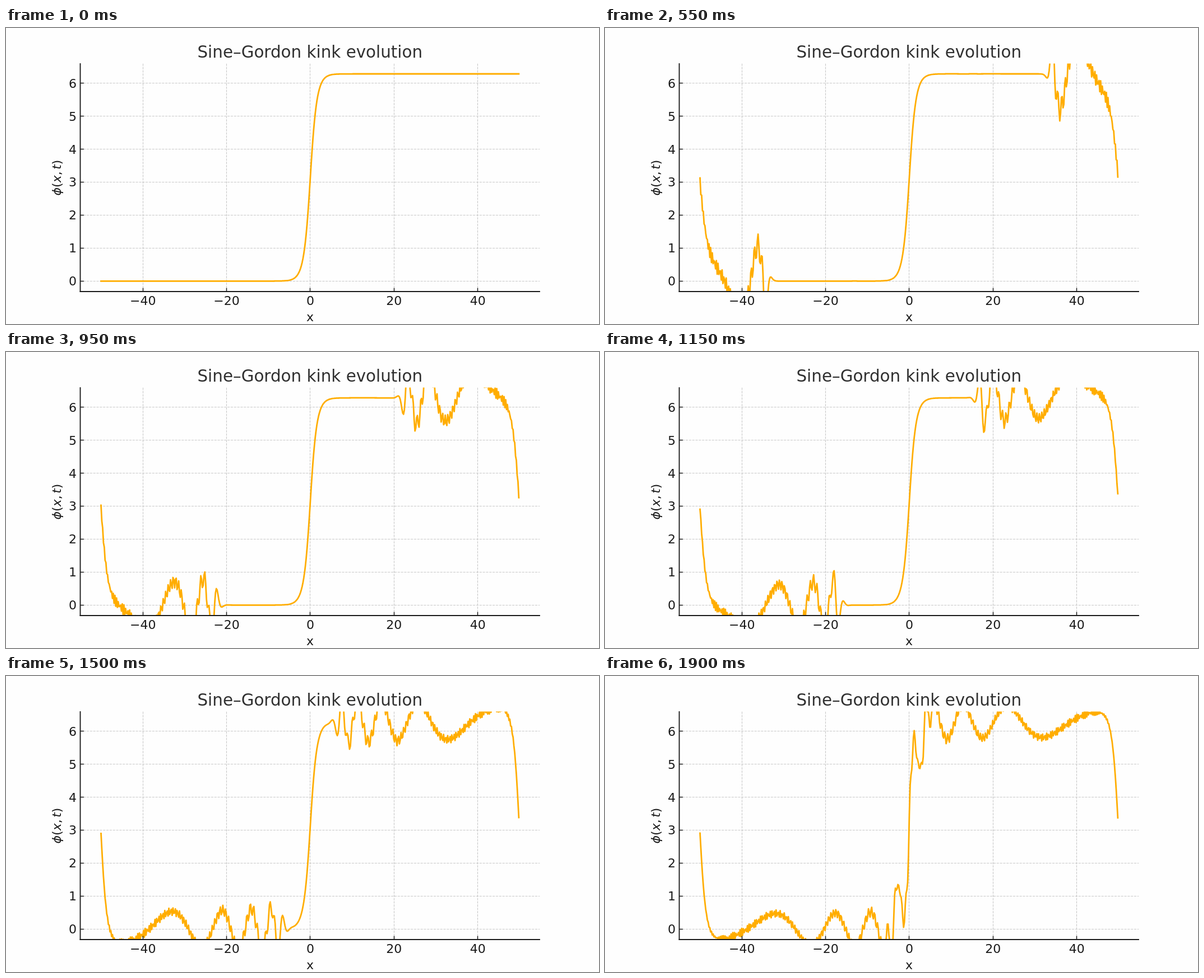
Write an HTML page that moves like this. It is 1058 px wide and 529 px high and loops after 1950 ms.

```html
<!DOCTYPE html>
<html lang="en">
<head>
<meta charset="utf-8">
<title>Kink evolution</title>
<style>
  html, body { margin: 0; width: 100%; height: 100%; overflow: hidden; background: #fefefe; }
  svg { display: block; width: 1058px; height: 529px; }
  text { font: 22.04px "DejaVu Sans", sans-serif; fill: #1a1a1a; }
  .title { font-size: 29.39px; fill: #303030; }
  .middle { text-anchor: middle; }
  .end { text-anchor: end; }
  .italic { font-style: oblique; }
  .grid { stroke: #c8c8c8; stroke-width: 1.1; stroke-dasharray: 4.08 1.76; }
  .tick { stroke: #1a1a1a; stroke-width: 1.47; }
  .spine { stroke: #1a1a1a; stroke-width: 1.84; stroke-linecap: square; }
  #wave { fill: none; stroke: #ffad00; stroke-width: 2.755; stroke-linejoin: round; stroke-linecap: square; }
</style>
</head>
<body>
<svg viewBox="0 0 1058 529">
  <clipPath id="plot"><rect x="132.25" y="63.48" width="819.95" height="407.33"/></clipPath>
  <g id="grid"></g>
  <path id="wave" clip-path="url(#plot)"/>
  <g id="axes">
    <line class="spine" x1="132.5" y1="64" x2="132.5" y2="471"/>
    <line class="spine" x1="132.5" y1="471" x2="952" y2="471"/>
  </g>
  <text class="title middle" x="542.3" y="52.5">Sine–Gordon kink evolution</text>
  <text class="middle" x="542.5" y="523.7">x</text>
  <text transform="translate(98 299.5) rotate(-90)"><tspan class="italic">ϕ</tspan>(<tspan class="italic">x</tspan>,<tspan class="italic" dx="3.5">t</tspan>)</text>
</svg>
<script>
const box = { left: 132.25, right: 952.2, top: 63.48, bottom: 470.81 };
const COUNT = 512, STEP = 100 / COUNT, DT = 0.4 * STEP;
const FRAMES = 39, STEPS_PER_FRAME = 20, FRAME_MS = 50;

// The data range fills the axes with a 5 % margin on each side.
const unitX = (box.right - box.left) / 1.1 / (100 - STEP);
const unitY = (box.bottom - box.top) / 1.1 / (2 * Math.PI);
const px = x => box.left + (box.right - box.left) * 0.05 / 1.1 + (x + 50) * unitX;
const py = y => box.bottom - (box.bottom - box.top) * 0.05 / 1.1 - y * unitY;
const crisp = v => Math.floor(v) + 0.5;

function add(parent, name, attrs, content = "") {
  const node = document.createElementNS("http://www.w3.org/2000/svg", name);
  for (const key in attrs) node.setAttribute(key, attrs[key]);
  node.textContent = content;
  document.getElementById(parent).append(node);
}
const line = (parent, cls, x1, y1, x2, y2) => add(parent, "line", { class: cls, x1, y1, x2, y2 });

for (let v = -40; v <= 40; v += 20) {
  const x = crisp(px(v));
  line("grid", "grid", x, box.bottom, x, box.top);
  line("axes", "tick", x, 471, x, 464.6);
  add("axes", "text", { class: "middle", x: px(v), y: 494.6 }, String(v).replace("-", "−"));
}
for (let v = 0; v <= 6; v++) {
  const y = crisp(py(v));
  line("grid", "grid", box.left, y, box.right, y);
  line("axes", "tick", 132.5, y, 138.9, y);
  add("axes", "text", { class: "end", x: 126, y: py(v) + 8 }, v);
}

// Leapfrog integration of u_tt = u_xx - sin u on a periodic grid.
function acceleration(u) {
  return u.map((c, i) =>
    (u[(i + 1) % COUNT] - 2 * c + u[(i + COUNT - 1) % COUNT]) / STEP ** 2 - Math.sin(c));
}
const toPath = u => "M" + Array.from(u, (v, i) =>
  px(-50 + i * STEP).toFixed(2) + " " + py(v).toFixed(2)).join("L");

function simulate() {
  let now = Float64Array.from({ length: COUNT }, (_, i) => 4 * Math.atan(Math.exp(-50 + i * STEP)));
  const start = acceleration(now);
  let before = now.map((v, i) => v + 0.5 * DT ** 2 * start[i]);
  const paths = [toPath(now)];
  while (paths.length < FRAMES) {
    for (let n = 0; n < STEPS_PER_FRAME; n++) {
      const a = acceleration(now);
      const next = now.map((v, i) => 2 * v - before[i] + DT ** 2 * a[i]);
      before = now;
      now = next;
    }
    paths.push(toPath(now));
  }
  return paths;
}

const paths = simulate();
const wave = document.getElementById("wave");
let shown = -1;
function draw() {
  const frame = Math.floor(performance.now() / FRAME_MS) % FRAMES;
  if (frame !== shown) wave.setAttribute("d", paths[shown = frame]);
  requestAnimationFrame(draw);
}
draw();
</script>
</body>
</html>
```
